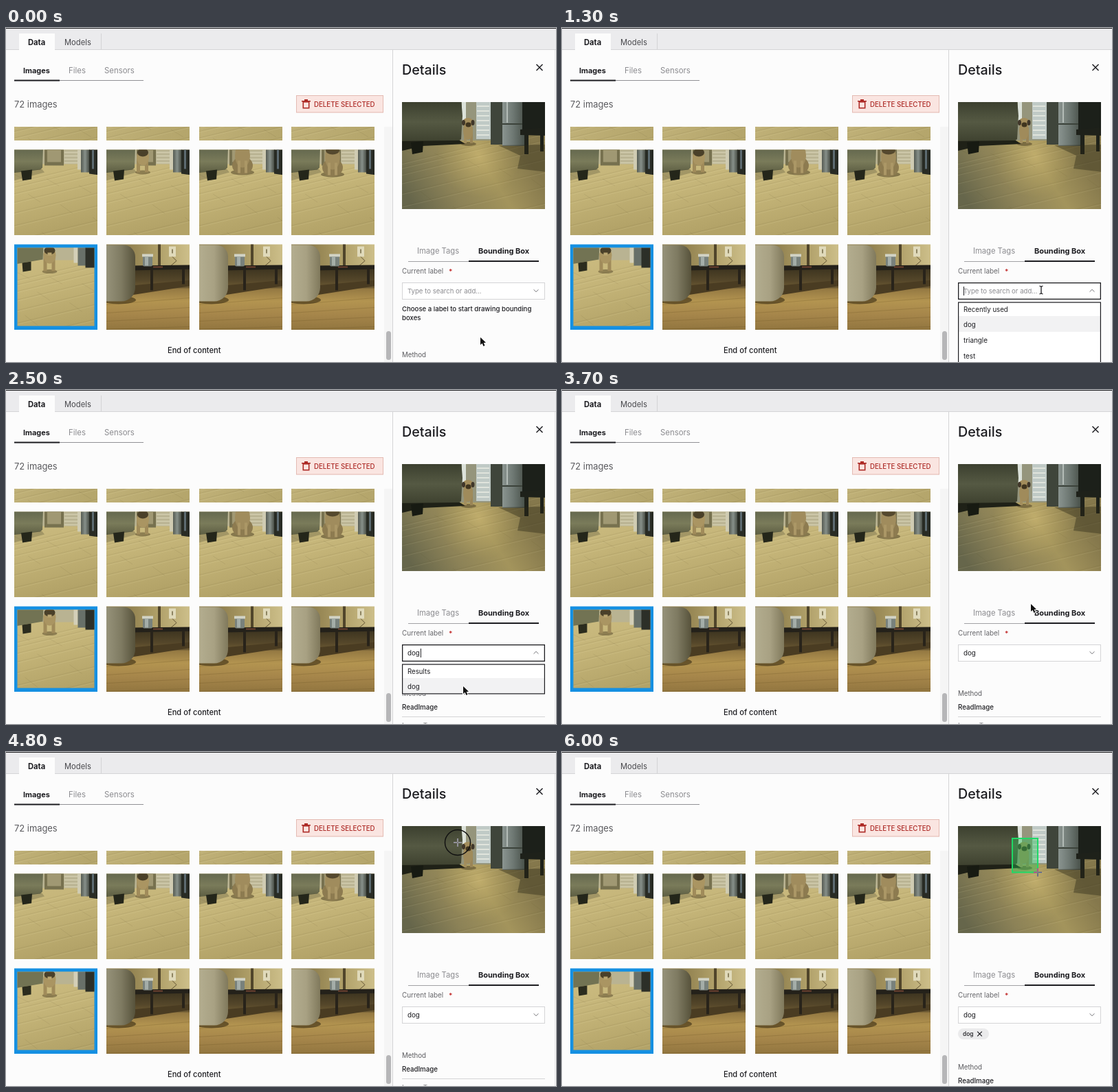
Write an HTML page with a canvas that moves like this. It is 800 by 487 pixels and loops after 7000 ms.

```html
<!DOCTYPE html>
<html lang="en">
<head>
<meta charset="utf-8">
<title>Bounding box labelling</title>
<style>
html, body { margin: 0; width: 100%; height: 100%; overflow: hidden; background: #fcfcfc; }
canvas { display: block; width: 800px; height: 487px; }
</style>
</head>
<body>
<canvas id="stage" width="800" height="487"></canvas>
<script>
const stage = document.getElementById('stage');
const still = document.createElement('canvas');
still.width = 800;
still.height = 487;
let c = still.getContext('2d');
const INK = '#1c1c20', GREY = '#8b8b8f', LINE = '#d4d4d6';

function text(s, x, mid, size, color = INK, weight = 400) {
  c.font = `${weight} ${size}px Inter, "Open Sans", sans-serif`;
  c.fillStyle = color;
  c.fillText(s, x, mid + 0.8 + size * 0.36);
}
function rect(color, x, y, w, h) {
  c.fillStyle = color;
  c.fillRect(x, y, w, h);
}
function frame(color, x, y, w, h, lw = 1) {
  c.strokeStyle = color;
  c.lineWidth = lw;
  c.strokeRect(x + lw / 2, y + lw / 2, w - lw, h - lw);
}
function round(color, x, y, w, h, r) {
  c.fillStyle = color;
  c.beginPath();
  c.roundRect(x, y, w, h, r);
  c.fill();
}
function trace(p) {
  c.beginPath();
  for (let i = 0; i < p.length; i += 2) c.lineTo(p[i], p[i + 1]);
}
function poly(color, ...p) {
  trace(p);
  c.fillStyle = color;
  c.fill();
}
function stroke(color, lw, ...p) {
  trace(p);
  c.strokeStyle = color;
  c.lineWidth = lw;
  c.stroke();
}
function oval(color, x, y, rx, ry) {
  c.fillStyle = color;
  c.beginPath();
  c.ellipse(x, y, rx, ry, 0, 0, 7);
  c.fill();
}
function fade(x0, y0, x1, y1, ...colors) {
  const g = c.createLinearGradient(x0, y0, x1, y1);
  colors.forEach((k, i) => g.addColorStop(i / (colors.length - 1), k));
  return g;
}
function glow(color, x, y, r) {
  const g = c.createRadialGradient(x, y, 0, x, y, r);
  g.addColorStop(0, color);
  g.addColorStop(1, 'rgba(190,170,100,0)');
  rect(g, x - r, y - r, 2 * r, 2 * r);
}
// Soft-focus picture clipped to its box
function photo(x, y, w, h, draw) {
  c.save();
  c.beginPath();
  c.rect(x, y, w, h);
  c.clip();
  c.translate(x, y);
  c.filter = 'blur(0.7px)';
  draw();
  c.restore();
}

// Floorboards: faint slanted seams
function planks(w, top, alpha) {
  const dark = `rgba(92,80,44,${alpha})`, light = `rgba(250,240,195,${alpha})`;
  for (let i = 0; i < 8; i++) {
    const y = top + 6 + i * i * 1.5 + i * 5, x = (i * 47) % w;
    stroke(dark, 0.8, 0, y + w * 0.1, w, y - w * 0.14);
    stroke(light, 1, 0, y + 2 + w * 0.1, w, y + 2 - w * 0.14);
    stroke(dark, 0.8, x, y, x + 18, y + 9 + i);
  }
}

function floor(w) {
  rect(fade(0, 0, 30, 124, '#cdbd82', '#c4b478', '#b3a368'), -4, -4, w + 8, 136);
  planks(w, 30, 0.12);
}

function standing(x, s) {
  oval('rgba(70,58,32,.45)', x, 32 * s, 11, 3);
  rect('#a08b5a', x - 9, 8, 5, 24 * s);
  rect('#a08b5a', x + 3, 8, 5, 24 * s);
  oval('#aa9562', x, 11, 9, 12);
  oval('#4a4029', x, 4, 8, 6);
}

function sitting(x, y) {
  oval('rgba(70,58,32,.5)', x, y + 33, 17, 4);
  oval('#8d7b50', x, y + 23, 15, 13);
  oval('#a08c5d', x, y + 8, 11, 18);
  rect('#ab9766', x - 7, y + 16, 4, 18);
  rect('#ab9766', x + 3, y + 16, 4, 18);
}

// Room thumbnails; pose 0 empty, 1 standing, 2 sitting, 3 sitting lower
function room(pose) {
  floor(121);
  rect('#b9b392', 40, -4, 56, 25);
  rect('#77714f', 44, -4, 28, 27);
  rect('#a09873', 48, -4, 20, 22);
  for (let y = 3; y < 20; y += 5) rect('#cfcaab', 73, y, 22, 2);
  poly(fade(0, 0, 0, 34, '#65694f', '#7a7b5a', '#5c5d42'), -4, -4, 42, -4, 41, 26, 38, 29, -4, 34);
  poly('#34352440', -4, 34, 40, 28, 44, 33, -4, 46);
  poly('#24261a', 10, 31, 26, 29, 25, 43, 12, 45);
  rect('#cfcbb2', 92, -4, 5, 33);
  rect(fade(96, 0, 110, 0, '#4d5249', '#87908a', '#3f443c'), 97, -4, 13, 37);
  poly('#282b24', 109, -4, 125, -4, 125, 37, 109, 35);
  rect('#5c6a70', 113, -4, 3, 32);
  if (pose === 1) standing(53, 1.03);
  if (pose > 1) sitting(pose === 2 ? 63 : 60, pose === 2 ? 0 : 3);
  if (pose === 3) oval('#54482e', 60, 1, 10, 6);
}

function selected() {
  rect('#1590e2', 12, 315.5, 121, 124.5);
  photo(16.5, 320.5, 112, 114, () => {
    floor(112);
    rect('#b9b392', 36, -4, 52, 22);
    poly('#727353', -4, -4, 38, -4, 37, 17, -4, 24);
    poly('#2b2c1e', 7, 22, 20, 20, 20, 33, 8, 35);
    rect('#d3cfb8', 82, -4, 6, 26);
    rect('#687069', 88, -4, 12, 30);
    rect('#2c2f28', 99, -4, 17, 33);
    standing(47, 1.08);
    rect('#b9a571', 44, 7, 6, 4);
  });
}

// Speaker beside a table; tone shades the cylinder from left to right
function corner(cup, outlet, tone) {
  rect(fade(30, 0, 121, 0, '#8f7f4e', '#b0a069', '#cdbf8a'), -4, -4, 129, 70);
  rect(fade(0, 36, 0, 70, '#3e3520', '#55472a', '#7d673a'), -4, 35, 129, 40);
  rect(fade(0, 62, 0, 124, '#8f7440', '#b39450', '#a5854a', '#92763f'), -4, 64, 129, 66);
  poly('#4a3c22', 36, 60, 125, 52, 125, 60, 36, 74);
  for (let i = 0; i < 4; i++) stroke('rgba(84,64,28,.2)', 1, 0, 88 + i * 12, 121, 78 + i * 14);
  rect('#50452b', 75, -4, 4, 36);
  rect('#e0dabb', outlet, 3, 10, 15);
  rect('#8d8461', outlet + 4, 7, 2, 6);
  stroke('#615333', 1, outlet + 5, 18, outlet + 11, 24, outlet + 3, 31);
  poly('#24211a', 36, 31, 125, 30, 125, 36, 36, 38);
  rect('#28231a', 64, 37, 4, 30);
  rect('#28231a', 110, 36, 4, 22);
  rect('#6e4230', 68, 32, 14, 2);
  round('#78817c', cup, 16, 14, 16, 2);
  rect('#d2d3c5', cup - 1, 14, 16, 4);
  rect('#a4ada8', cup + 3, 18, 5, 13);
  oval('rgba(45,34,14,.55)', 18, 81, 25, 6);
  round(fade(0, 0, 43, 0, ...tone), -20, 1, 62, 82, [14, 17, 20, 16]);
}

function preview() {
  rect(fade(20, 156, 170, 60, '#66664b', '#8c8257', '#a3945c', '#85784c'), -4, -4, 216, 164);
  glow('rgba(212,190,120,.6)', 112, 78, 62);
  planks(208, 62, 0.1);
  rect('#95957c', 84, -4, 46, 60);
  rect('#dce2da', 87, -4, 6, 32);
  rect('#c0cac6', 108, -4, 21, 58);
  for (let y = 5; y < 50; y += 7) rect('#e0e4dc', 109, y, 18, 2);
  poly(fade(0, 0, 0, 58, '#3c402f', '#555943', '#3e412f'), -4, -4, 86, -4, 88, 20, 86, 54, 82, 57, -4, 58);
  poly('#1f2117', -4, 57, 84, 56, 92, 61, 30, 64, -4, 72);
  poly('#171a12', 13, 59, 31, 57, 30, 73, 15, 76);
  rect('#3f453b', 129, -4, 19, 66);
  rect(fade(146, 0, 178, 0, '#8b9591', '#6d7772', '#4a524b'), 146, -4, 32, 68);
  rect('#3c433b', 146, 31, 32, 2);
  rect('#b4bcb7', 152, -4, 2, 34);
  rect('#1c201a', 175, -4, 37, 52);
  poly('#1e211a', 172, 40, 212, 37, 212, 49, 172, 48);
  rect('#1e211a', 178, 46, 6, 30);
  rect('#1e211a', 201, 46, 5, 26);
  poly('rgba(44,42,24,.4)', 140, 63, 212, 62, 212, 102, 168, 97, 172, 78);
  oval('rgba(55,45,24,.45)', 97, 61, 11, 3);
  rect('#a38e5e', 90, 37, 4, 23);
  rect('#9a8557', 99, 37, 4, 23);
  oval('#a08b5b', 96, 42, 7, 13);
  oval('#a38d5c', 96, 30, 8, 7);
  oval('#40372a', 89.5, 30, 2.5, 4);
  oval('#40372a', 103, 30, 2.5, 4);
  oval('#40351f', 96.5, 33, 4, 3.5);
}

function page() {
  rect('#fcfcfc', 0, 0, 800, 487);
  rect('#ebebed', 0, 0, 800, 32);
  rect('#29292b', 0, 0, 800, 1);
  rect(LINE, 0, 31, 800, 1);
  rect('#fcfcfc', 19, 8, 52, 24);
  rect(LINE, 138, 8, 1, 24);
  text('Data', 32, 20, 11.2, INK, 700);
  text('Models', 85, 20, 11.2, '#48484c');

  text('Images', 25, 61, 10.9, INK, 700);
  text('Files', 91, 61, 11.4, GREY);
  text('Sensors', 143, 61, 11.4, GREY);
  rect('#909094', 78, 76, 122, 1);
  rect(INK, 12, 75.5, 66, 2);
  text('72 images', 12, 110.5, 12.9, '#5a5a5e');

  const red = '#ad2a26';
  rect('#fae5e1', 422, 98, 127, 25.5);
  frame('#e4bbb3', 422, 98, 127, 25.5);
  rect(red, 430, 106, 13, 1.5);
  rect(red, 434, 104, 5, 2);
  frame(red, 431.5, 107, 10, 10.5, 1.6);
  text('DELETE SELECTED', 448, 110.5, 9.7, red, 500);

  const col = i => 12 + Math.round(i * 134.4);
  const tones = [['#96927a', '#7f7b62', '#555039'], ['#b3ad8f', '#a8a183', '#7e775a'], ['#b3ad8f', '#a8a183', '#7e775a']];
  for (let i = 0; i < 4; i++) {
    photo(col(i), 144, 121, 20, () => {
      rect(fade(0, 0, 121, 20, '#bfb077', '#b4a56b'), -4, -4, 129, 28);
      planks(121, -18, 0.12);
    });
    photo(col(i), 177.5, 121, 124.5, () => room(i));
    if (i) photo(col(i), 315.5, 121, 124.5, () => corner([0, 53, 52, 56][i], [0, 91, 93, 96][i], tones[i - 1]));
  }
  selected();
  text('End of content', 235, 469, 11.1, INK, 500);

  rect('#f5f5f5', 550, 144, 12, 343);
  round('#b6b6b8', 553, 442, 7, 42, 3.5);
  rect(LINE, 562, 32, 1, 455);
  rect('#e5e5e7', 798, 32, 1, 455);
  text('Details', 576, 60, 19.7, INK, 500);
  cross(776, 57.5, 4.5, INK, 1.5);
  photo(576, 108, 208, 156, preview);
  text('Image Tags', 598, 324.5, 11.2, GREY);
  text('Bounding Box', 687, 324.5, 11, INK, 700);
  rect('#a0a0a4', 585, 340, 88, 1);
  rect(INK, 673, 339, 102, 2);
  text('Current label', 576, 354, 9.9, '#66666a');
  text('*', 644, 355, 10, '#c22a2a', 600);
}

function cross(x, y, r, color, lw) {
  stroke(color, lw, x - r, y - r, x + r, y + r);
  stroke(color, lw, x + r, y - r, x - r, y + r);
}

function form(t) {
  const word = t < 1700 ? '' : 'dog'.slice(0, (t - 1600) / 100);
  const open = t >= 1300 && t < 2800, tagged = t >= 5700;

  if (!word) {
    text('Choose a label to start drawing bounding', 576, 408.5, 9.6, INK, 500);
    text('boxes', 576, 422, 9.6, INK, 500);
  }
  const top = word ? (tagged ? 459 : 442) : 475.5;
  text('Method', 576, top, 9.7, '#5a5a5e');
  text('ReadImage', 576, top + 20, 9.7, INK, 500);
  rect(LINE, 576, top + 34, 208, 1);
  text('Image Type', 576, top + 47, 9.7, GREY);

  rect('#fff', 576, 371, 208, 25);
  frame(open ? INK : LINE, 576, 371, 208, 25, open ? 1.3 : 1);
  text(word || 'Type to search or add...', 584, 383, word ? 9.8 : 9.6, word ? INK : GREY);
  const d = open ? -1.7 : 1.7;
  stroke('#77777b', 1, 767.5, 383 - d, 771, 383 + d, 774.5, 383 - d);
  if (open) {
    rect(INK, word ? 585 + c.measureText(word).width : 584, 377, 1, 13);
    const h = word ? 44 : 100;
    rect('#fff', 576, 399.5, 208, h);
    rect('#f2f2f3', 577, 420, 206, 23);
    frame(INK, 576, 399.5, 208, h, 1.2);
    text(word ? 'Results' : 'Recently used', 584, 410, 9.7);
    text('dog', 584, 431.5, 9.7);
    if (!word) {
      text('triangle', 584, 454.5, 9.9);
      text('test', 584, 477.5, 9.8);
    }
  }
  if (tagged) {
    round('#ebebec', 576, 403, 45, 16, 8);
    text('dog', 583, 410.5, 8.3, INK, 500);
    cross(607.5, 411, 3.3, INK, 1.2);
  }
}

// time, x, y of the pointer
const path = [
  [0, 690, 451], [900, 690, 451], [1300, 697, 382], [2000, 697, 382], [2500, 665, 432],
  [3600, 665, 432], [3700, 682, 312], [4300, 660, 140], [4500, 660, 140], [4800, 657, 132],
  [4900, 655, 126], [5300, 692, 171], [5500, 692, 175.5], [7000, 692, 175.5]
];
function pointerAt(t) {
  const i = path.findIndex(p => p[0] > t);
  const [t0, x0, y0] = path[i - 1], [t1, x1, y1] = path[i];
  const k = (t - t0) / (t1 - t0), e = k * k * (3 - 2 * k);
  return [x0 + (x1 - x0) * e, y0 + (y1 - y0) * e];
}

function box(t, x, y) {
  if (t < 5000) return;
  const done = t >= 5700;
  rect(done ? 'rgba(35,190,85,.4)' : 'rgba(205,45,45,.42)', 655, 126, x - 655, y - 126);
  frame(done ? '#1fd966' : '#c5202b', 654, 125, x - 653, y - 124, done ? 2 : 1.5);
}

function pointer(t, x, y) {
  if (t >= 1700 && t < 2100) return;
  if (y < 264) {
    // White over dark areas, dark over light ones
    c.globalCompositeOperation = 'difference';
    stroke('#fff', 1.4, x - 6, y, x + 6, y);
    stroke('#fff', 1.4, x, y - 6, x, y + 6);
    c.globalCompositeOperation = 'source-over';
    if (t >= 4600 && t < 5600) {
      c.beginPath();
      c.arc(x, y, 18.5, 0, 7);
      c.strokeStyle = '#111';
      c.lineWidth = 1.5;
      c.stroke();
    }
  } else if (y > 371 && y < 396) {
    stroke(INK, 1.3, x, y - 5, x, y + 5);
    for (const s of [-1, 1]) stroke(INK, 1.3, x - 2.5, y + 6 * s, x, y + 5 * s, x + 2.5, y + 6 * s);
  } else {
    const p = [0, 0, 0, 11, 2.6, 8.7, 4.5, 13, 6.5, 12, 4.7, 8, 8, 7.8, 0, 0]
      .map((v, i) => v + (i % 2 ? y : x));
    stroke('#fff', 2, ...p);
    poly('#111', ...p);
  }
}

function draw(now) {
  const t = Math.floor(now % 7000 / 100) * 100;
  const [x, y] = pointerAt(t);
  c.drawImage(still, 0, 0);
  form(t);
  box(t, x, y);
  pointer(t, x, y);
}

page();
c = stage.getContext('2d');
const start = performance.now();
function tick() {
  draw(performance.now() - start);
  requestAnimationFrame(tick);
}
tick();
</script>
</body>
</html>
```
